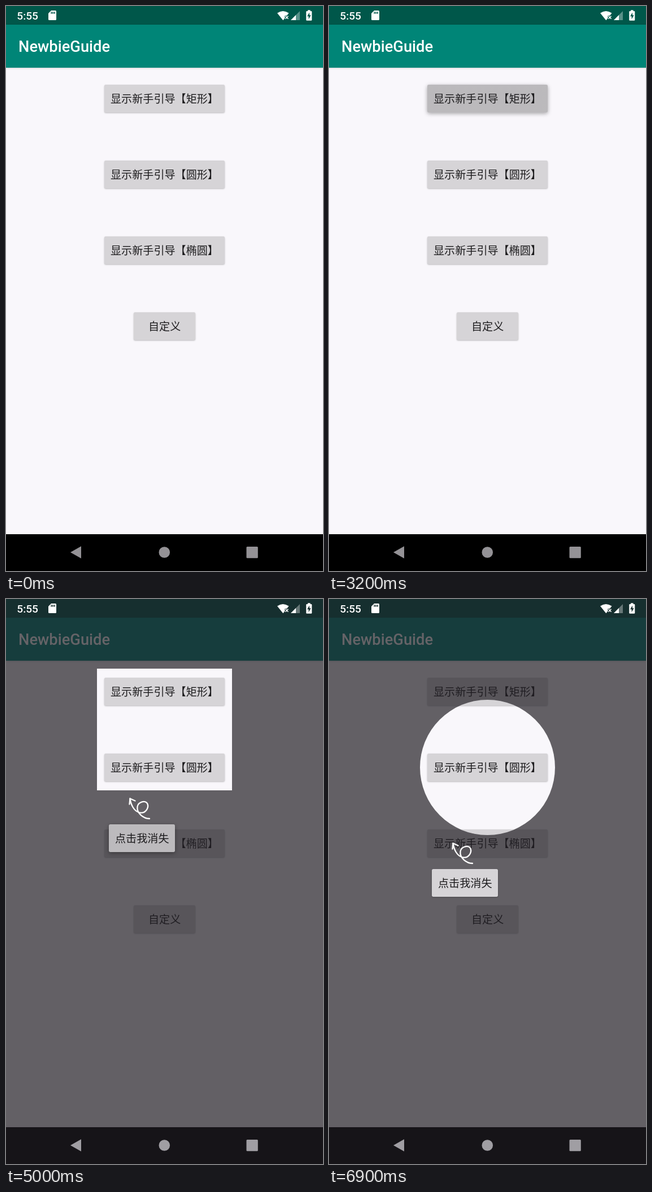
Recreate the animation shown at these times as an HTML page. Size 561 by 998 pixels, loop 8 s.

```html
<!DOCTYPE html>
<html lang="zh-CN">
<head>
<meta charset="utf-8">
<title>NewbieGuide</title>
<style>
  html, body { margin: 0; width: 100%; height: 100%; overflow: hidden; background: #f9f7fb; }
  #stage { position: relative; width: 561px; height: 998px; overflow: hidden; background: #f9f7fb; }
  #stage > * { position: absolute; }
  .bar { left: 0; width: 561px; }
  #status { top: 0; height: 33px; background: #00574a; }
  #tool { top: 33px; height: 76px; background: #008577; box-shadow: 0 1px 3px rgba(0,0,0,.16); }
  #nav { top: 933px; height: 65px; background: #000; }
  .roboto { font-family: Roboto, "Noto Sans", sans-serif; font-weight: 500; fill: #fff; }
  .btn {
    box-sizing: border-box; height: 49px; border-radius: 2.7px; background-color: #d6d4d7;
    color: #1c1b1d; font: 400 19.1px/49px "Noto Sans CJK SC", "Noto Sans CJK", sans-serif;
    text-align: center; white-space: nowrap; box-shadow: 0 1px 2.5px rgba(0,0,0,.26);
  }
  .btn.up { box-shadow: 0 2px 7px rgba(0,0,0,.34); }
  .btn span { position: absolute; top: 0; left: 11px; }
  svg { left: 0; top: 0; }
</style>
</head>
<body>
<div id="stage">
  <div id="status" class="bar"></div>
  <div id="tool" class="bar"></div>
  <svg width="561" height="120"><text class="roboto" x="22" y="81.3" font-size="27.3">NewbieGuide</text></svg>
  <div id="nav" class="bar"></div>
  <div class="btn" id="rect" style="left:174px;top:139px;width:213px"><span>显示新手引导【矩形】</span></div>
  <div class="btn" id="circle" style="left:174px;top:273px;width:213px"><span>显示新手引导【圆形】</span></div>
  <div class="btn" style="left:174px;top:407px;width:213px"><span>显示新手引导【椭圆】</span></div>
  <div class="btn" style="left:226px;top:541px;width:109px"><span style="left:26px">自定义</span></div>

  <svg width="561" height="998">
    <path id="mask" fill="rgb(33,30,36)" fill-opacity=".69" fill-rule="evenodd"/>
    <g id="arrow" fill="none" stroke="#fff" stroke-width="2.3" stroke-linecap="round" stroke-linejoin="round">
      <path d="M218.5 362.5L219.5 352.5L228.5 356.5"/>
      <path d="M219.5 352.5C221 363 226 375 237 377.5C247 379 253 369 250.5 362C247 354.500 234 358 232.500 367C231 378 243 388 254 388"/>
    </g>
  </svg>
  <div class="btn" id="tip" style="left:182px;width:117px"><span>点击我消失</span></div>

  <svg width="561" height="998">
    <text class="roboto" x="19.3" y="23.8" font-size="19.1">5:55</text>
    <g fill="#fff">
      <path d="M80 8H87.500Q89 8 89 9.500V23.500Q89 25 87.500 25H76.500Q75 25 75 23.500V13Z"/>
      <path d="M480 12.500Q490 5.500 500.500 12.500L497 17H493.500V21.500L490.300 25.200Z"/>
      <path d="M504 25L520 9V25Z" opacity=".35"/>
      <path d="M504 25L513 16V25Z"/>
      <path d="M534 9V7.300H538.500V9H540Q541.300 9 541.300 10.300V24.500Q541.300 25.800 540 25.800H532.500Q531.200 25.800 531.200 24.500V10.300Q531.200 9 532.500 9Z"/>
    </g>
    <path d="M494.500 17.700L499.500 22.700M499.500 17.700L494.500 22.700" stroke="#fff" stroke-width="1.6"/>
    <g id="holes" fill="#00574a">
      <path d="M79.500 10.300h1.700v3.500h-1.700zM82.300 10.300h1.700v3.500h-1.700zM85.100 10.300h1.700v3.500h-1.700z"/>
      <path d="M537 11.500L533 18.300H535.600V23.300L539.600 16.300H537Z"/>
    </g>
    <g id="keys">
      <path d="M114 965L133 954.300V975.700Z"/>
      <circle cx="280.3" cy="965" r="9.800"/>
      <rect x="425.500" y="955" width="20.300" height="20.300" rx="1.500"/>
    </g>
  </svg>
</div>
<script>
  const LOOP = 8000;
  const el = id => document.getElementById(id);
  const FULL = 400;
  const RECT = 'M161 123H400V338H161Z';
  const ROUND = 'M161 297.5a119.5 119.5 0 1 0 239 0a119.5 119.5 0 1 0 -239 0Z';

  // press: [button, ripple radius, tint, raised]
  const steps = [
    { at: 0 },
    { at: 3100, press: [['rect', 68, .04, true]] },
    { at: 3200, press: [['rect', FULL, .126, true]] },
    { at: 3400, hole: RECT, tip: 398, press: [['rect', FULL, .03]] },
    { at: 4800, hole: RECT, tip: 398, press: [['tip', 34, .04]] },
    { at: 4900, hole: RECT, tip: 398, press: [['tip', 56, .08, true]] },
    { at: 5000, hole: RECT, tip: 398, press: [['tip', FULL, .122, true]] },
    { at: 6500, press: [['circle', 68, .033]] },
    { at: 6600, press: [['circle', 108, .08, true]] },
    { at: 6700, press: [['circle', FULL, .126, true]] },
    { at: 6800, hole: ROUND, tip: 477, press: [['circle', FULL, .03]] },
    { at: 6900, hole: ROUND, tip: 477 }
  ];
  const touch = { rect: '88px 15px', circle: '88px 15px', tip: '58px 24px' };

  function ripple(id, r = 0, tint = 0, raised = false) {
    const b = el(id);
    const ink = `rgba(0,0,0,${tint})`;
    b.style.backgroundImage = r
      ? `radial-gradient(circle at ${touch[id]}, ${ink} ${r}px, transparent ${r + 1}px)` : 'none';
    b.classList.toggle('up', raised);
  }

  function show(s) {
    const open = !!s.hole;
    for (const id in touch) ripple(id);
    for (const p of s.press || []) ripple(...p);
    el('mask').setAttribute('d', open ? 'M0 0H561V998H0Z' + s.hole : '');
    el('tip').style.display = el('arrow').style.display = open ? '' : 'none';
    if (open) {
      el('tip').style.top = s.tip + 'px';
      el('arrow').setAttribute('transform', `translate(0 ${s.tip - 398})`);
    }
    el('holes').setAttribute('fill', open ? '#19302f' : '#00574a');
    el('keys').setAttribute('fill', open ? '#a09ea3' : '#949296');
  }

  const start = performance.now();
  let current;
  function tick() {
    const t = (performance.now() - start) % LOOP;
    const s = steps.findLast(k => k.at <= t);
    if (s !== current) show(current = s);
    requestAnimationFrame(tick);
  }
  tick();
</script>
</body>
</html>
```
